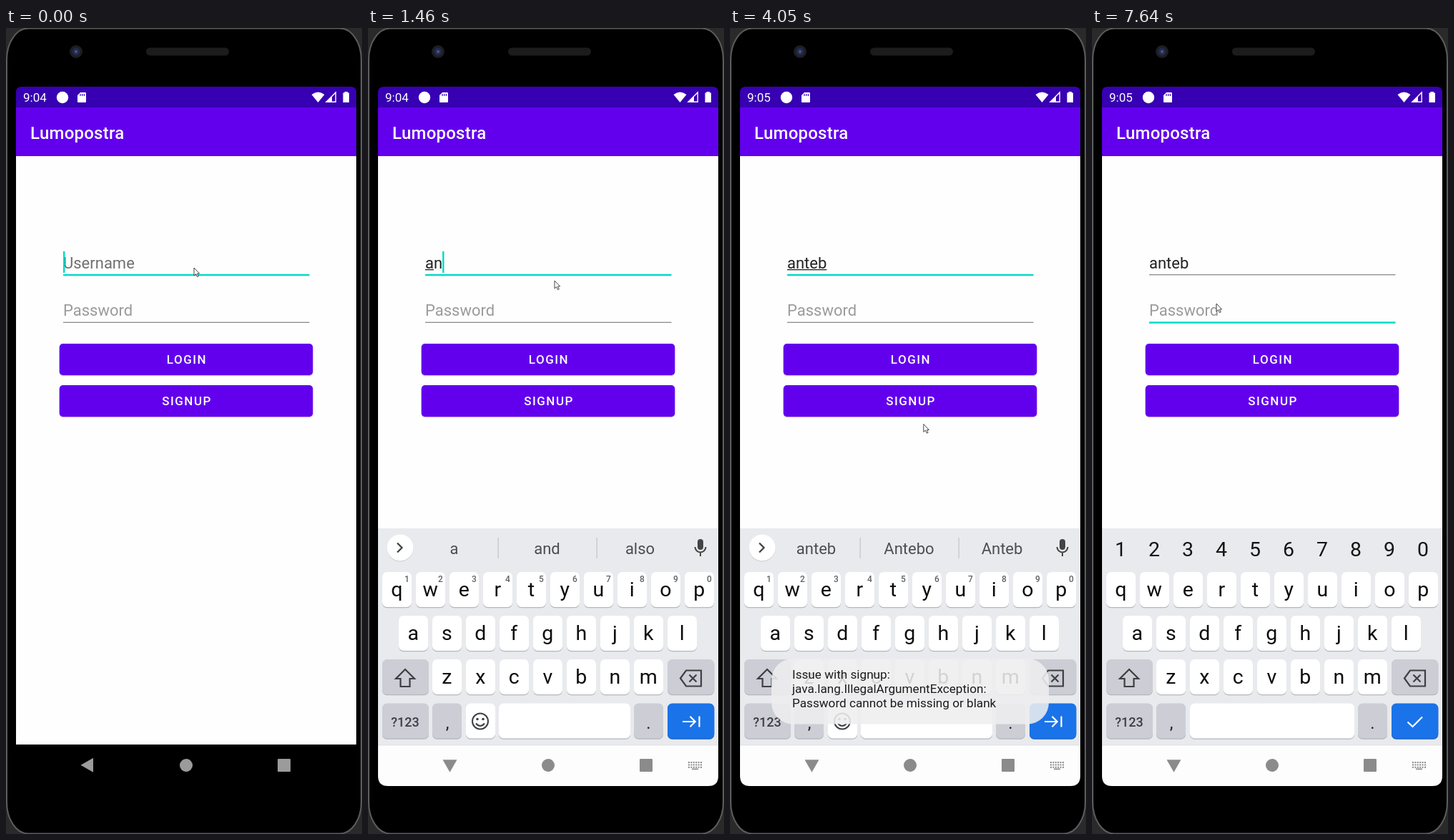
Write an HTML page that moves like this. It is 498 px wide and 1126 px high and loops after 8000 ms.

```html
<!DOCTYPE html>
<html lang="en">
<head>
<meta charset="utf-8">
<title>Login screen</title>
<style>
html, body { margin: 0; width: 100%; height: 100%; overflow: hidden; background: #000; }
svg { display: block; width: 498px; height: 1126px; font-family: Roboto, "Noto Sans", sans-serif; }
</style>
</head>
<body>
<svg id="stage" viewBox="0 0 498 1126"></svg>
<script>
const LOOP = 8000, TEAL = '#03dac5', INK = '#3c4043';
const stage = document.getElementById('stage');
const pen = document.createElement('canvas').getContext('2d');
const textWidth = s => (pen.font = '22px Roboto, "Noto Sans", sans-serif', pen.measureText(s).width);

// time, typed text, underlined letters, suggestions
const typing = [
  [0, '', 0, []],
  [1210, 'a', 1, []],
  [1330, 'a', 1, ['a', 'and', 'also']],
  [1460, 'an', 1, ['a', 'and', 'also']],
  [1610, 'an', 2, ['an', 'and', 'any']],
  [1750, 'ant', 3, ['ant', 'anti', 'ants']],
  [1880, 'ante', 4, ['ante', 'antenna', 'antes']],
  [2150, 'anteb', 5, ['ante', 'antenna', 'antes']],
  [2270, 'anteb', 5, ['anteb', 'Antebo', 'Anteb']],
  [7120, 'anteb', 0, ['anteb', 'Antebo', 'Anteb']]
];
// time, x, y of the pointer tip
const pointer = [
  [120, 263, 335], [420, 261, 353], [2760, 261, 353], [3260, 267, 517], [3900, 267, 517],
  [4750, 313, 953], [5400, 313, 953], [6400, 155, 479], [6440, 155, 479], [6840, 174, 385]
];

const clamp = v => Math.max(0, Math.min(1, v));
const ramp = (t, a, b) => clamp((t - a) / (b - a));
const smooth = v => v * v * (3 - 2 * v);
const rect = (x, y, w, h, fill, r = 0, more = '') =>
  `<rect x="${x}" y="${y}" width="${w}" height="${h}" rx="${r}" fill="${fill}" ${more}/>`;
const circle = (x, y, r, fill, more = '') => `<circle cx="${x}" cy="${y}" r="${r}" fill="${fill}" ${more}/>`;
const shape = (d, fill) => `<path d="${d}" fill="${fill}"/>`;
const line = (d, color, w = 2) => `<path d="${d}" fill="none" stroke="${color}" stroke-width="${w}"/>`;
const text = (s, x, y, size, fill, more = '') =>
  `<text x="${x}" y="${y}" font-size="${size}" fill="${fill}" ${more}>${s}</text>`;
const mid = (s, x, y, size, fill, more = '') => text(s, x, y, size, fill, 'text-anchor="middle" ' + more);

function pointerAt(t) {
  let [, x, y] = pointer[0];
  for (let i = 1; i < pointer.length; i++) {
    const [t0, x0, y0] = pointer[i - 1], [t1, x1, y1] = pointer[i];
    if (t >= t0) {
      const k = smooth(ramp(t, t0, t1));
      x = x0 + (x1 - x0) * k;
      y = y0 + (y1 - y0) * k;
    }
  }
  return [x.toFixed(1), y.toFixed(1)];
}

const body = rect(0, 0, 498, 1126, '#2a2a2a') +
  rect(1, 0.5, 496, 1125, '#000', 30, 'ry="44" stroke="#5c5c5e" stroke-width="2"') +
  rect(196, 27.5, 116, 11, '#1c1c1c', 5.5) +
  circle(98, 33, 9, '#1d1e24') + circle(98, 33, 5.5, '#232a48') + circle(98, 33, 2.2, '#465280');

const statusIcons = circle(79, 97, 8.2, '#fff') +
  shape('M104 90H111Q112 90 112 91V103Q112 104 111 104H101Q100 104 100 103V94Z', '#fff') +
  line('M104 92V95M106.7 92V95M109.4 92V95', '#3700b3', 1.2) +
  shape('M427.5 93Q436.5 86 445.5 93L436.5 104Z', '#fff') +
  line('M448 103.2L461.2 90V103.2Z', '#fff', 1.4) + shape('M447 104L456 95V104Z', '#fff') +
  shape('M473.5 89H478V90.5H480V104H471.5V90.5H473.5Z', '#fff');

function button(label, y) {
  return rect(74.7, y + 1.3, 354.6, 44, '#c9c6d0', 5) + rect(74.7, y, 354.6, 44, '#6200ee', 5) +
    mid(label, 253, y + 28.3, 17, '#fff', 'font-weight="500" letter-spacing="1.5"');
}

function field(value, hint, y, focused, hintColor) {
  return (value ? text(value, 80, y, 22, '#212121') : text(hint, 80, y, 22, hintColor)) +
    (focused ? rect(80, y + 8.3, 344.5, 2.5, TEAL) : rect(80, y + 8.7, 344.5, 1.1, '#757575'));
}

function key(x, y, w, fill = '#fff', shade = '#b4b6bb') {
  return rect(x, y + 1.2, w, 49, shade, 6.5) + rect(x, y, w, 49, fill, 6.5);
}

const GREY = '#cccdd5';
const letterRows = [['qwertyuiop', 20, 760], ['asdfghjkl', 43, 821], ['zxcvbnm', 90, 882]];
const baseKeys = rect(14, 699, 476, 303, '#e8eaed') +
  letterRows.map(([row, x, y]) => [...row].map((c, i) =>
    key(x + 47 * i, y, 41) + mid(c, x + 20.3 + 47 * i, y + 33.7, 28.5, '#0c0c0c')).join('')).join('') +
  key(20, 882, 65, GREY) + line('M52 896L39 909H45.5V920H58.5V909H65Z', INK, 2.2) +
  key(419, 882, 65.3, GREY) +
  line('M437 908.5L445 897.5H466V919.5H445ZM449.5 903.5L459.5 913.5M459.5 903.5L449.5 913.5', INK, 2.2) +
  key(20, 943.5, 65, GREY) + mid('?123', 52, 975.5, 18, INK, 'font-weight="500"') +
  key(90, 943.5, 41, GREY) + mid(',', 111, 979, 24, '#222') +
  key(372, 943.5, 41, GREY) + mid('.', 392.5, 979, 24, '#222') +
  key(419, 943.5, 65.3, '#1a73e8', '#165fc0');

const emojiKey = key(137, 943.5, 41) + circle(157, 968.5, 11, 'none', `stroke="${INK}" stroke-width="2"`) +
  circle(153, 965.5, 1.8, INK) + circle(161, 965.5, 1.8, INK) + line('M151 971.5Q157 978.5 163 971.5', INK);
const numberRow = [...'1234567890'].map((d, i) => mid(d, 40 + 47 * i, 737.5, 28.5, '#151515')).join('');
const digitHints = [...'1234567890'].map((d, i) =>
  mid(d, 54.5 + 47 * i, 774, 12, '#5f6368', 'font-weight="500"')).join('');
const strip = circle(45, 727, 18.5, '#c9cbcf') + circle(45, 726, 18.5, '#fff') +
  line('M41 719.5L47.5 726L41 732.5', INK, 2.2) +
  rect(181.5, 712, 1.2, 29, '#c2c4c9') + rect(319.5, 712, 1.2, 29, '#c2c4c9') +
  rect(461, 714, 8, 15, '#444', 4) + line('M457.5 725A7.5 7.5 0 0 0 472.5 725M465 732.5V738', '#444');
const actions = {
  enter: 'M461.5 963V970H441M447 963.5L440.8 970L447 976.5',
  next: 'M440 969H457M450.5 961.8L457.7 969L450.5 976.2M463.5 961.5V976.5',
  done: 'M441.5 969.5L448.5 976L462 962.5'
};

function keyboard(t, words) {
  const suggesting = t >= 780 && t < 7260;
  const action = t < 780 ? 'enter' : t < 7260 ? 'next' : 'done';
  const top = suggesting
    ? strip + digitHints + words.map((w, i) => mid(w, 120.5 + 130 * i, 735, 22, '#4b4e52')).join('')
    : numberRow;
  const space = suggesting ? emojiKey + key(183, 943.5, 184) : key(137, 943.5, 230);
  return baseKeys + top + space + line(actions[action], '#fff', 2.2);
}

function navigation(t) {
  const light = t >= 660, color = light ? '#8b8b8b' : '#9b9b9b';
  const turn = -90 * smooth(ramp(t, 450, 650));
  let dots = '';
  for (let r = 0; r < 3; r++)
    for (let c = 0; c < 6; c++) dots += rect(448 + c * 3.4, 1025 + r * 3.4, 2, 2, color);
  return (light ? shape('M14 1001H490V1045Q490 1059 476 1059H28Q14 1059 14 1045Z', '#fdfdfd') +
      rect(14, 1001, 476, 1.5, '#e3e4e6') : '') +
    `<g transform="translate(114.5 1029.8) rotate(${turn.toFixed(1)})">${shape('M-10 0L7.5 -10V10Z', color)}</g>` +
    circle(252, 1030, 9, color) + rect(380, 1021, 18, 18, color, 1) +
    (t >= 360 ? dots + rect(453, 1034.5, 9, 1.6, color) : '');
}

function toast(t) {
  const alpha = ramp(t, 3700, 3960) * (1 - ramp(t, 5920, 6260));
  if (!alpha) return '';
  const lines = ['Issue with signup:', 'java.lang.IllegalArgumentException:', 'Password cannot be missing or blank'];
  return `<g opacity="${alpha.toFixed(2)}">` + rect(58, 881, 388, 91.5, '#eeeeef', 30, 'fill-opacity=".88"') +
    lines.map((s, i) => text(s, 87, 909 + 20.2 * i, 17.15, '#1c1c1c')).join('') + '</g>';
}

function scene(t) {
  const [, name, marked, words] = typing.findLast(row => t >= row[0]);
  const onPassword = t >= 7120;
  const lastKey = onPassword ? 7120 : typing.findLast(row => t >= row[0] && row[0] <= 2270)[0];
  const caretOn = Math.floor((t - lastKey) / 500) % 2 === 0;
  const caretX = onPassword ? 80 : 80 + textWidth(name);
  const rise = 303 * (1 - ramp(t, 120, 400)) ** 2;
  const [px, py] = pointerAt(t);
  return body +
    '<clipPath id="screen"><rect x="14" y="82" width="476" height="920"/></clipPath>' +
    rect(14, 179, 476, 822, '#fefefe') +
    shape('M14 111V90Q14 82 22 82H482Q490 82 490 90V111Z', '#3700b3') +
    rect(14, 111, 476, 68, '#6200ee') +
    text(t < 2270 ? '9:04' : '9:05', 24, 103, 17, '#fff') + statusIcons +
    text('Lumopostra', 34, 155, 24, '#fff', 'font-weight="500" letter-spacing=".2"') +
    field(name, 'Username', 335.5, !onPassword, t < 360 ? '#707070' : '#9b9b9b') +
    field('', 'Password', 402, onPassword, '#9b9b9b') +
    (marked ? rect(80, 337, textWidth(name.slice(0, marked)), 1.3, '#212121') : '') +
    (caretOn ? rect(caretX, onPassword ? 379 : 312, 2.4, 30, TEAL) : '') +
    button('LOGIN', 441) + button('SIGNUP', 499) +
    (t >= 120 ? `<g clip-path="url(#screen)"><g transform="translate(0 ${rise.toFixed(1)})">${keyboard(t, words)}</g></g>` : '') +
    navigation(t) + toast(t) +
    `<path transform="translate(${px} ${py})" d="M0 0V11L2.6 8.6L4.5 12.6L6.3 11.8L4.5 8H7.6Z" fill="#fff" stroke="#333" stroke-width=".9"/>`;
}

const start = performance.now();
let shown = '';
function frame() {
  const markup = scene((performance.now() - start) % LOOP);
  if (markup !== shown) stage.innerHTML = shown = markup;
  requestAnimationFrame(frame);
}
frame();
</script>
</body>
</html>
```
